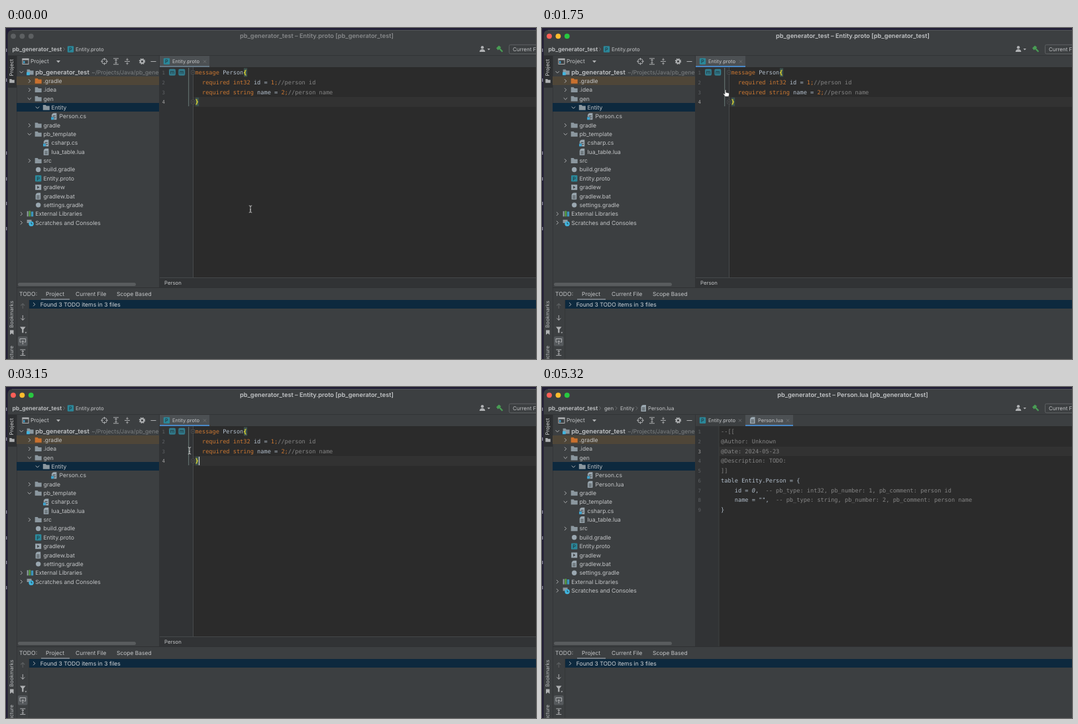
Write an HTML page that moves like this. It is 800 px wide and 499 px high and loops after 5.46 s.

```html
<!DOCTYPE html>
<html lang="en">
<head>
<meta charset="utf-8">
<title>Code generator demo</title>
<style>
  html, body { margin: 0; width: 100%; height: 100%; overflow: hidden; background: #1d1a2e; }
  svg { display: block; width: 100vw; height: 100vh; }
  text { white-space: pre; font-family: Inter, "Open Sans", sans-serif; font-size: 8.6px;
         fill: #c3c5c7; text-rendering: geometricPrecision; }
  .code { font-family: "DejaVu Sans Mono", "Noto Sans Mono", monospace; font-size: 8.65px; fill: #b2becb; }
  .kw { fill: #cc7832; }
  .dim { fill: #858585; }
  .brace { fill: #ffef28; font-weight: 700; }
  .b { font-weight: 600; }
  .line { fill: none; stroke: #afb1b3; stroke-width: 1; }
  .faint { fill: none; stroke: #75787a; stroke-width: .8; }
</style>
</head>
<body>
<svg id="stage" viewBox="0 0 800 499" preserveAspectRatio="none"></svg>
<script>
const LOOP = 5460, STEP = 70;
const ROW = 13.35, LINE = 14.72, CHAR = 5.21;

// drawing helpers, each returns markup
const rect = (x, y, w, h, fill, more = '') =>
  `<rect x="${x}" y="${y}" width="${w}" height="${h}" fill="${fill}" ${more}/>`;
const path = (d, more = 'class="line"') => `<path d="${d}" ${more}/>`;
const dot = (x, y, r, fill) => `<circle cx="${x}" cy="${y}" r="${r}" fill="${fill}"/>`;
const text = (x, y, s, more = '') => `<text x="${x}" y="${y}" ${more}>${s}</text>`;
const size = n => `style="font-size:${n}px"`;
const span = (cls, s) => `<tspan class="${cls}">${s}</tspan>`;
const group = (id, s) => `<g id="${id}">${s}</g>`;
const at = (x, y, s) => `<g transform="translate(${x} ${y})">${s}</g>`;
const upright = (y, s, fill) =>
  `<text transform="translate(11.2 ${y}) rotate(-90)" style="font-size:7.7px;fill:${fill}">${s}</text>`;
const chevron = (x, y, open, cls = 'line') =>
  path(open ? `M${x - 2.7} ${y - 1.4}l2.7 2.7 2.7-2.7` : `M${x - 1.4} ${y - 2.7}l2.7 2.7-2.7 2.7`, `class="${cls}"`);
const cross = (x, y) => path(`M${x - 2} ${y - 2}l4 4m0-4l-4 4`, 'class="faint"');

const folderShape = fill => path('M-5-4h4l1.3 1.6h4.7v6.2h-10z', `fill="${fill}"`);
const docShape = path('M-1-5h4.5v10h-7.5v-7zM-4-2.7l2.3-2.3v2.3z', 'fill="#9aa7b0"');
const icons = {
  folder: folderShape('#8b979f'),
  orange: folderShape('#c9702e'),
  module: folderShape('#8b979f') + rect(-5.5, 0, 4.6, 4.6, '#40b6e0'),
  cs: docShape + rect(-5.5, .5, 5, 5, '#3c3f41') + rect(-4.8, 1, 4, 4, '#40a5d0') +
      path('M-2.2-.8h4M-.2 2h2.4', 'stroke="#3c3f41"'),
  doc: docShape + path('M-2.5-.7h4.5M-2.5 1.2h4.5M-2.5 3h4.5', 'stroke="#3c3f41" stroke-width=".8"'),
  round: dot(0, 0, 3.7, '#9aa7b0'),
  proto: rect(-4.7, -4.7, 9.4, 9.4, '#2b8799', 'rx="1.2"') +
         text(0, 2.7, 'P', 'text-anchor="middle" style="font-size:7.5px;fill:#202b30"'),
  run: rect(-4.5, -4, 9, 8, '#9aa7b0') + path('M-1.5-2.2l3.3 2.2-3.3 2.2z', 'fill="#3c3f41"'),
  libs: rect(-5, -4, 2.2, 8, '#8b979f') + rect(-2, -4.5, 2.4, 8.5, '#58a043') + rect(1.2, -3.5, 3.4, 7.5, '#3c95bb'),
  scratch: path('M-5-4.5h7v5h-7z', 'fill="#8b979f"') + dot(1.5, 1.6, 3.7, '#40b6e0') +
           path('M1.5-.6v2.4h1.8', 'fill="none" stroke="#2b3b42" stroke-width=".9"')
};
const icon = (name, x, y) => at(x, y, icons[name]);

// depth, label, icon, arrow (1 open, 0 closed, none when absent)
const files = [
  [0, 'pb_generator_test', 'module', 1], [1, '.gradle', 'orange', 0], [1, '.idea', 'folder', 0],
  [1, 'gen', 'folder', 1], [2, 'Entity', 'folder', 1], [3, 'Person.cs', 'cs'],
  [1, 'gradle', 'folder', 0], [1, 'pb_template', 'folder', 1], [2, 'csharp.cs', 'cs'],
  [2, 'lua_table.lua', 'doc'], [1, 'src', 'folder', 0], [1, 'build.gradle', 'round'],
  [1, 'Entity.proto', 'proto'], [1, 'gradlew', 'run'], [1, 'gradlew.bat', 'doc'],
  [1, 'settings.gradle', 'round'], [0, 'External Libraries', 'libs', 0],
  [0, 'Scratches and Consoles', 'scratch', 0]
];
const generated = [3, 'Person.lua', 'doc'];
const rowFill = { '.gradle': '#4f4638', Entity: '#0d293e' };

function tree(rows) {
  return rows.map(([depth, name, pic, arrow], i) => {
    const x = 44.3 + depth * 12.1, y = 66.6 + i * ROW;
    let s = rowFill[name] ? rect(16, Math.round(y - 6.8), 215, 13, rowFill[name]) : '';
    if (arrow !== undefined) s += chevron(x - 21, y, arrow);
    s += icon(pic, x - 7.7, y);
    return s + text(x, y + 3, name, i ? '' : 'class="b" style="font-size:9.3px"');
  }).join('') +
    `<g clip-path="url(#side)">${text(129, 69.6, '~/Projects/Java/pb_generator_test', 'style="fill:#7d8082"')}</g>`;
}

const lineY = i => 70.2 + i * LINE;
const code = (x, i, s, cls = '') => text(x, lineY(i), s, `class="code ${cls}"`);
const numbers = (n, current) => Array.from({ length: n }, (_, i) =>
  text(235.5, lineY(i), i + 1, `class="code" style="font-size:7.4px;fill:${i === current ? '#a4a3a3' : '#606366'}"`)).join('');
const methodMark = x => rect(x - 5, 61.8, 10, 10, '#31798a', 'rx="2"') +
  text(x, 69.3, 'm', 'text-anchor="middle" style="font-size:7.5px;fill:#1f2c31"');
const foldMark = y => rect(279.7, y - 2.5, 5, 5, '#2b2b2b', 'stroke="#55585a" stroke-width=".7"') +
  path(`M281 ${y}h2.4`, 'class="faint"');
const tab = (id, x, w) => rect(x, 42, w, 17, '#4c5053') + rect(x, 57, w, 2, '#667885') +
  group(id, rect(x, 57, w, 2, '#4a88c7'));
const crumb = (x, s) => text(x, 35, s, size(7.9));

function protoScene() {
  return tree(files) +
    icon('proto', 97.5, 32) + crumb(105, 'Entity.proto') +
    tab('protoFocus', 232, 75) + icon('proto', 242.5, 50.3) + text(251, 53.3, 'Entity.proto', size(7.6)) + cross(300, 50.5) +
    rect(232, 59, 568, 317, '#2b2b2b') + rect(232, 59, 50, 317, '#313335') +
    rect(282, 104, 518, 15, '#323232') +
    path('M282.5 59V376', 'stroke="#505355" stroke-width=".8"') +
    numbers(4, 3) + methodMark(251) + methodMark(265.3) +
    rect(286 + 14 * CHAR, 60.5, CHAR, 13, '#3b514d') + rect(286, 104.8, CHAR, 13, '#3b514d') +
    code(285.6, 0, span('kw', 'message') + ' Person' + span('brace', '{')) +
    code(285.6, 1, span('kw', '  required int32') + ' id = ' + span('kw', '1;') + span('dim', '//person id')) +
    code(285.6, 2, span('kw', '  required string') + ' name = ' + span('kw', '2;') + span('dim', '//person name')) +
    code(285.6, 3, span('brace', '}')) +
    rect(275, 60, 1.3, 58, '#5c6a68') +
    foldMark(67) + foldMark(111.5) +
    group('protoCaret', rect(291, 105, 1.2, 13, '#d0d0d0')) +
    rect(232, 376, 568, 15, '#313335') + rect(232, 376, 568, 1, '#45484a') +
    text(239, 387, 'Person', size(7.8));
}

function luaScene() {
  const rows = files.slice();
  rows.splice(6, 0, generated);
  const lines = ['--[[', '@Author: Unknown', '@Date: 2024-05-23', '@Description: TODO:', ']]'];
  const note = (type, n, name) =>
    span('dim', `  -- pb_type: ${type}, pb_number: ${n}, pb_comment: person ${name}`);
  return tree(rows) +
    crumb(94, 'gen') + chevron(112, 32, 0, 'faint') + crumb(118, 'Entity') + chevron(143, 32, 0, 'faint') +
    icon('doc', 153.5, 32) + crumb(160, 'Person.lua') +
    icon('proto', 242.5, 50.3) + text(251, 53.3, 'Entity.proto', size(7.6)) + cross(299, 50.5) +
    tab('luaFocus', 307, 72) + icon('doc', 318, 50.3) + text(326, 53.3, 'Person.lua', size(7.6)) + cross(371, 50.5) +
    rect(232, 59, 568, 332, '#2b2b2b') + rect(232, 59, 35, 332, '#313335') +
    rect(267, 90, 533, 14, '#323232') +
    path('M267 59V391', 'stroke="#45484a" stroke-width=".7"') +
    numbers(9, 2) +
    lines.map((s, i) => code(270, i, s, 'dim')).join('') +
    code(270, 5, 'table Entity.Person = {') +
    code(270, 6, '    id = <tspan font-style="italic">0</tspan>,' + note('int32', 1, 'id')) +
    code(270, 7, '    name = "",' + note('string', 2, 'name')) +
    code(270, 8, '}') +
    group('luaCaret', rect(270, 90.2, 1.3, 13, '#d0d0d0'));
}

function frameParts() {
  const box = '#3c3f41';
  return rect(0, 0, 800, 499, '#211d35') +
    [31, 76, 186, 225, 262, 300].map(y => rect(0, y, 1.3, 5, '#8f8da0')).join('') +
    rect(2.5, 3, 810, 510, box, 'rx="7"') +
    path('M9 3.4H800', 'stroke="#5b5d62" stroke-width=".8"') +
    rect(3, 41, 797, 1, '#323436') +
    text(469, 15.2, '', 'id="title" class="b" text-anchor="middle" style="font-size:9.22px"') +
    text(9.5, 35, 'pb_generator_test', 'class="b" style="font-size:8.55px"') + chevron(87.5, 32, 0, 'faint') +
    // main toolbar
    dot(719, 29.3, 2.2, '#afb1b3') + path('M714.7 36c0-5.4 8.6-5.4 8.6 0z', 'fill="#afb1b3"') +
    path('M726.5 31h4.4l-2.2 2.4z', 'fill="#afb1b3"') +
    path('M740 30.3l4-3.7 3.2 2.3-1.2 1.6 4.2 4.4-1.6 1.5-4.4-4.4-1.7 1.4z', 'fill="#499c54"') +
    rect(759.5, 25.3, 60, 13.6, box, 'rx="2" stroke="#5e6163"') + text(765, 35, 'Current File', size(7.9)) +
    // left stripe
    rect(3, 42, 13, 48, '#2d2f31') + upright(72.5, 'Project', '#d5d6d7') +
    at(9, 80, `<g transform="scale(.75)">${folderShape('#afb1b3')}</g>`) +
    upright(452, 'Bookmarks', '#bbbdbf') + path('M6 455.5h5.5v7l-2.7-2.2-2.8 2.2z', 'fill="#afb1b3"') +
    upright(512.5, 'Structure', '#bbbdbf') + rect(16, 42, .8, 457, '#323436') +
    // project header
    rect(25, 46.3, 9, 8.2, 'none', 'stroke="#afb1b3"') + rect(24.6, 46, 9.8, 2.4, '#afb1b3') +
    rect(26.2, 49.8, 2.2, 3.5, '#40a5d0') +
    text(37, 53.3, 'Project', size(8.4)) + path('M76 49h6l-3 3.4z', 'fill="#afb1b3"') +
    `<circle cx="148.5" cy="50.3" r="3.9" class="line"/>` + path('M148.5 45v3.5m0 3.6v3.5M143.2 50.3h3.5m3.6 0h3.5') +
    path('M162 46h8M162 54.8h8M166 47.5v5.6M164.4 49l1.6-1.7 1.6 1.7M164.4 51.8l1.6 1.7 1.6-1.7') +
    path('M179 50.4h8M183 45.5v3M181.5 47l1.5 1.6 1.5-1.6M183 55.4v-3M181.5 54l1.5-1.6 1.5 1.6') +
    `<circle cx="205.5" cy="50.3" r="2.6" fill="none" stroke="#afb1b3" stroke-width="2"/>` +
    `<circle cx="205.5" cy="50.3" r="4" fill="none" stroke="#afb1b3" stroke-width="1.4" stroke-dasharray="1.7 1.44"/>` +
    path('M218.5 50.5h8') +
    rect(231, 42, 1, 349, '#323436') + rect(18, 384, 178, 5, '#595c5e', 'rx="2.5"') +
    // bottom tool window
    rect(16, 391, 784, 1, '#2f3133') +
    text(20, 403.8, 'TODO:') + text(60, 403.8, 'Project', size(8.45)) +
    text(105, 403.8, 'Current File', size(8.45)) + text(167, 403.8, 'Scope Based', size(8.45)) +
    rect(53, 408, 43, 2, '#747a80') +
    rect(35, 410, 765, 13, '#0d293e') + chevron(42.5, 416.7) +
    text(51.8, 419.8, 'Found 3 TODO items in 3 files', 'style="fill:#d3d5d7"') +
    rect(34.4, 410, .7, 89, '#343638') +
    path('M25.3 423v-7.5m-3 3l3-3 3 3', 'fill="none" stroke="#5c5f61" stroke-width="1.1"') +
    path('M25.3 433v7.5m-3-3l3 3 3-3') +
    path('M21 450.5h8.6l-3.2 4v5h-2.2v-5zM28.4 458.4h3l-1.5 2z', 'fill="#afb1b3"') +
    rect(18, 465, 14.5, 14.5, '#55595c', 'rx="2"') +
    path('M22.5 473.5h-1.5v-5h8.6v5h-1.5M25.3 477v-5.5m-2 2l2-2 2 2') +
    path('M21.3 485h8M21.3 493.6h8M25.3 486.5v5.6M23.7 488l1.6-1.7 1.6 1.7M23.7 490.8l1.6 1.7 1.6-1.7');
}

const lights = (id, colors) => group(id, colors.map((c, i) => dot(11 + i * 13.4, 12.3, 3.9, c)).join(''));

const popup = group('popup',
  rect(268, 69, 330, 60, '#3c3f41', 'stroke="#2b2d2e" stroke-width=".8"') +
  rect(268, 69, 330, 15.6, '#454849') +
  text(434.5, 79.8, 'choose operation', 'text-anchor="middle"') +
  rect(268, 87.5, 330, 13.5, '#2f65ca') +
  `<g clip-path="url(#menu)">` +
  text(268, 97.3, 'gen file:/Users/lanhoubing/Projects/Java/pb_generator_test/gen/Entity/Person.lua') +
  text(268, 110.6, 'save to...') + text(268, 123.8, 'copy to clipboard') + '</g>');

const pointers =
  group('beam', path('M-2.2-5.2q2.2 0 2.2 1.6v7.2q0 1.6-2.2 1.6M2.2-5.2q-2.2 0-2.2 1.6M2.2 5.2q-2.2 0-2.2-1.6M-1 1.2h2',
    'fill="none" stroke="#d6d6d6" stroke-width=".9"')) +
  group('arrow', path('M0 0v9.8l2.3-2.1 1.6 3.6 1.7-.8-1.6-3.5h3.2z', 'fill="#0a0a0a" stroke="#fff" stroke-width=".9"')) +
  group('hand', path('M-1 0q1-1 1.8 0v3.6l4 1q1 .4.8 1.8l-.9 3.6h-5l-3.2-4q.2-1.2 1.5-.6l1 .8z',
    'fill="#fff" stroke="#1a1a1a" stroke-width=".6"'));

document.getElementById('stage').innerHTML =
  '<defs><clipPath id="side"><rect x="16" y="42" width="215" height="349"/></clipPath>' +
  '<clipPath id="menu"><rect x="268" y="69" width="330" height="60"/></clipPath></defs>' +
  frameParts() +
  lights('lightsOff', ['#5d6062', '#5d6062', '#5d6062']) + lights('lightsOn', ['#fe5f57', '#febc2e', '#28c840']) +
  group('proto', protoScene()) + group('lua', luaScene()) + popup + group('pointer', pointers);

// spans of time in which each part is shown
const focused = [[1190, 1890], [2940, LOOP]];
const shown = {
  proto: [[0, 3990]],
  lua: [[3990, LOOP]],
  lightsOff: [[0, 1190], [1890, 2940]],
  lightsOn: focused,
  protoFocus: focused,
  luaFocus: focused,
  popup: [[1890, 2940]],
  protoCaret: [[1190, 1680], [2940, 3430]],
  luaCaret: [[3990, 4270], [4760, 5320]],
  beam: [[0, 490], [2940, 4480]],
  arrow: [[490, 770], [1890, 2940], [4480, 4620]],
  hand: [[770, 1890]]
};

// pointer stops: time, x, y
const stops = [
  [0, 369, 273], [630, 274.5, 75.5], [1120, 266, 66], [1470, 266, 66], [1750, 277, 93.5],
  [2030, 276.5, 93.5], [2870, 276.5, 93.5], [2940, 277, 96], [3990, 277, 96],
  [4200, 305.5, 205], [4270, 306, 208], [4620, 352, 508]
];

function pointerAt(t) {
  const i = stops.findIndex(s => s[0] > t);
  if (i < 0) return stops[stops.length - 1].slice(1);
  const [t0, x0, y0] = stops[i - 1], [t1, x1, y1] = stops[i];
  const u = (t - t0) / (t1 - t0), e = u * u * (3 - 2 * u);
  return [x0 + (x1 - x0) * e, y0 + (y1 - y0) * e];
}

const byId = id => document.getElementById(id);
const title = byId('title'), pointer = byId('pointer');
const parts = Object.keys(shown).map(id => [byId(id), shown[id]]);

function draw(t) {
  for (const [node, spans] of parts)
    node.style.display = spans.some(([a, b]) => t >= a && t < b) ? '' : 'none';
  title.textContent = `pb_generator_test – ${t < 3990 ? 'Entity.proto' : 'Person.lua'} [pb_generator_test]`;
  title.style.fill = t < 1190 ? '#87898b' : '#c3c5c7';
  pointer.setAttribute('transform', `translate(${pointerAt(t).join(' ')})`);
}

const start = performance.now();
let last = -1;
function tick() {
  const t = Math.floor((performance.now() - start) % LOOP / STEP) * STEP;
  if (t !== last) draw(last = t);
  requestAnimationFrame(tick);
}
draw(0);
requestAnimationFrame(tick);
</script>
</body>
</html>
```
